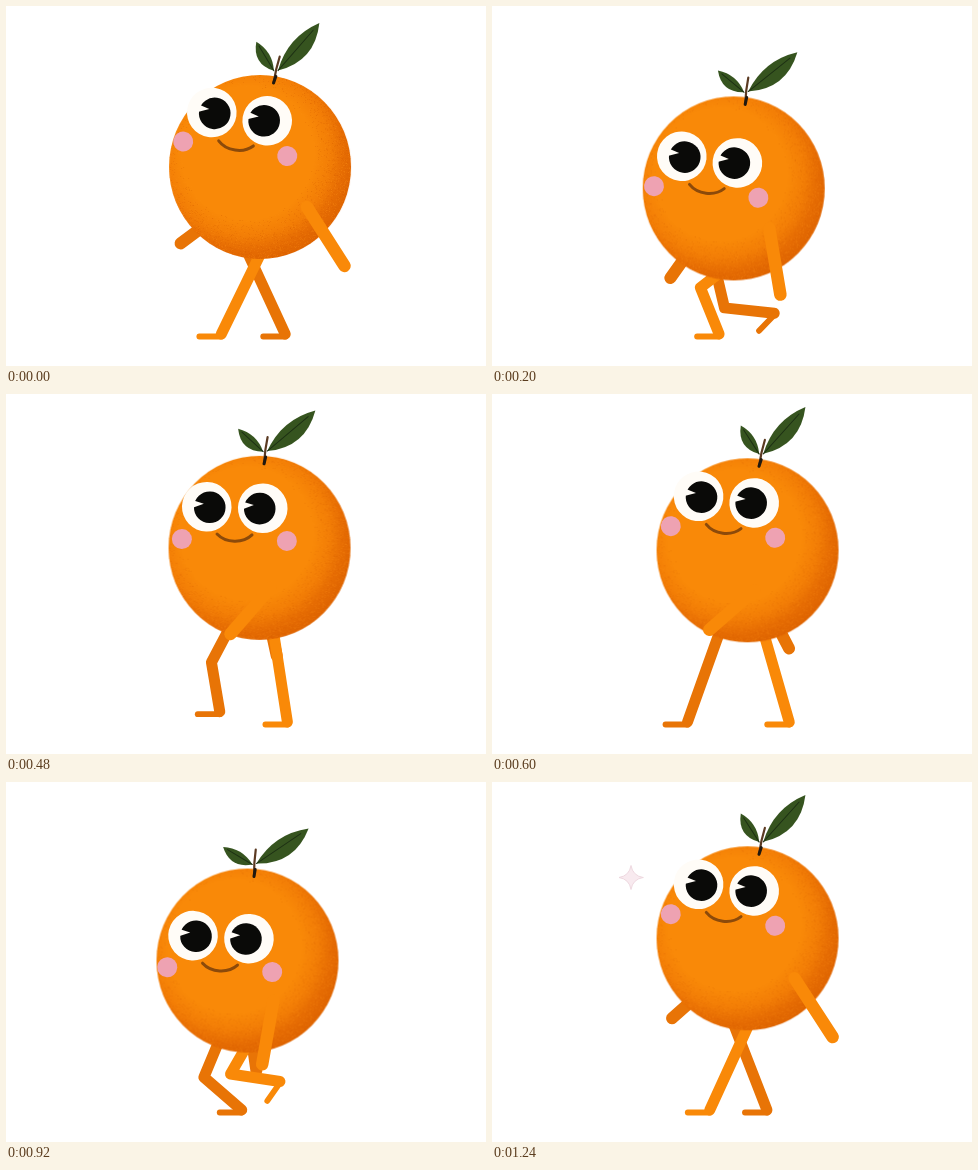
These frames come from a looping animation (480 px wide and 360 px high, 1280 ms). An HTML page with a canvas:

```html
<!DOCTYPE html>
<html lang="en">
<head>
<meta charset="utf-8">
<title>Walking orange</title>
<style>
  html, body { margin: 0; width: 100%; height: 100%; overflow: hidden; background: #fff; }
  canvas { display: block; width: 480px; height: 360px; }
</style>
</head>
<body>
<canvas id="stage" width="480" height="360"></canvas>
<script>
const LOOP = 1280, PACE = LOOP / 2, STEP = 40;
const LIGHT = '#f98908', DARK = '#e87406', LEAF = '#36541f', VEIN = '#1d3013';
const WHITE = '#fffcf7', BLACK = '#0a0a08', BLUSH = '#eea2b2';
const THIGH = 56, SHIN = 50, FOOT = 22, GROUND = 328;
const ctx = document.getElementById('stage').getContext('2d');
const rad = deg => deg * Math.PI / 180;

// Cosine between -1 and 1 that is highest at the given time
const wave = (t, peak, period) => Math.cos(2 * Math.PI * (t - peak) / period);
// Smooth rise and fall between two times, 0 elsewhere
const hump = (t, from, to) =>
  t < from || t > to ? 0 : Math.sin(Math.PI * (t - from) / (to - from)) ** 2;

function line(color, width, ...pts) {
  ctx.strokeStyle = color;
  ctx.lineWidth = width;
  ctx.lineCap = ctx.lineJoin = 'round';
  ctx.beginPath();
  for (const [x, y] of pts) ctx.lineTo(x, y);
  ctx.stroke();
}

function disc(color, x, y, r) {
  ctx.fillStyle = color;
  ctx.beginPath();
  ctx.arc(x, y, r, 0, 7);
  ctx.fill();
}

function placed(x, y, deg, draw) {
  ctx.save();
  ctx.translate(x, y);
  ctx.rotate(rad(deg));
  draw();
  ctx.restore();
}

function makePeel() {
  const c = document.createElement('canvas');
  c.width = c.height = 190;
  const g = c.getContext('2d');
  g.translate(95, 95);
  g.beginPath();
  g.ellipse(0, 0, 91, 92, 0, 0, 7);
  g.clip();
  const shade = g.createRadialGradient(-13, -14, 0, -13, -14, 112);
  shade.addColorStop(0, LIGHT);
  shade.addColorStop(0.6, LIGHT);
  shade.addColorStop(0.74, '#f37e06');
  shade.addColorStop(0.87, '#e66c03');
  shade.addColorStop(1, '#dd6301');
  g.fillStyle = shade;
  g.fillRect(-95, -95, 190, 190);
  // Sprayed grain over the shaded rim
  let seed = 7;
  const rnd = () => (seed = seed * 16807 % 2147483647) / 2147483647;
  for (let i = 0; i < 7000; i++) {
    const a = rnd() * 2 * Math.PI, r = 64 + 48 * Math.sqrt(rnd());
    g.fillStyle = rnd() < 0.5 ? 'rgba(214,92,0,.22)' : 'rgba(252,146,24,.22)';
    g.fillRect(Math.round(r * Math.cos(a)) - 13, Math.round(r * Math.sin(a)) - 14, 1, 1);
  }
  return c;
}
const peel = makePeel();

// Knee of a two-bone leg, bending toward the walking direction (left)
function kneeOf([hx, hy], [ax, ay]) {
  const dx = ax - hx, dy = ay - hy, d = Math.hypot(dx, dy);
  const along = d > THIGH + SHIN ? d / 2
    : (THIGH ** 2 - SHIN ** 2 + d * d) / (2 * d);
  const out = d > THIGH + SHIN ? 0 : Math.sqrt(THIGH ** 2 - along ** 2);
  return [hx + (dx * along - dy * out) / d, hy + (dy * along + dx * out) / d];
}

function leg(color, hip, phase, shift) {
  const p = phase % LOOP;
  const ankle = [257.5 - 43 * wave(p, 40, LOOP) - shift, GROUND - 29 * hump(p, 650, 1240)];
  const pitch = rad(56 * hump(p, 680, 1120));
  const heel = [ankle[0], ankle[1] + 2.5 * Math.cos(pitch)];
  const toe = [heel[0] - FOOT * Math.cos(pitch), heel[1] + FOOT * Math.sin(pitch)];
  line(color, 11, hip, kneeOf(hip, ankle), ankle);
  line(color, 5.8, heel, toe);
}

function farArm(x, y, t) {
  const s = wave(t, 45, LOOP);
  line(DARK, 12, [x - 12 - 30 * s, y + 48], [x - 17 - 64 * s, y + 110 - 10 * s - 25 * s * s]);
}

function nearArm(x, y, t) {
  const s = wave(t, -30, LOOP), a = rad(41 * s - 8), length = 65 + 5 * s;
  const sx = x + 27 + 20 * s, sy = y + 40;
  line(LIGHT, 12.5, [sx, sy], [sx + length * Math.sin(a), sy + length * Math.cos(a)]);
}

function leaf(x, y, deg, length, up, down) {
  placed(x, y, deg, () => {
    ctx.fillStyle = LEAF;
    ctx.beginPath();
    ctx.moveTo(0, 0);
    ctx.quadraticCurveTo(length / 2, -up, length, 0);
    ctx.quadraticCurveTo(length / 2, down, 0, 0);
    ctx.fill();
    line(VEIN, 1, [0, 0], [length * 0.85, 0]);
  });
}

function sprig(x, y, t) {
  const flap = wave(t, 330, PACE), lean = 6 - 5 * flap;
  placed(x, y, lean, () => {
    line('#5b3a22', 2.2, [0, 0], [0, -14], [1, -27]);
    line('#20180f', 3, [0, 0], [1, -7]);
    leaf(2, -13, 8 * flap - 41 - lean, 63, 15, 22);
    leaf(-2, -12, -15 * flap - 136 - lean, 34, 15, 9);
  });
}

function eye(x, look) {
  const px = x + look;
  disc(WHITE, x, 0, 24.8);
  disc(BLACK, px, 0.5, 15.8);
  ctx.fillStyle = WHITE;
  ctx.beginPath();
  ctx.moveTo(px - 17, -6);
  ctx.lineTo(px - 6, -3);
  ctx.lineTo(px - 17, 1.5);
  ctx.fill();
}

function face() {
  disc(BLUSH, -52, 33, 10);
  disc(BLUSH, 53, 32, 10);
  eye(-28, 3);
  eye(28, -3);
  ctx.strokeStyle = '#8c4a0a';
  ctx.lineWidth = 3;
  ctx.beginPath();
  ctx.moveTo(-17, 27);
  ctx.bezierCurveTo(-8, 36, 9, 36, 18, 27);
  ctx.stroke();
}

function sparkle(t) {
  if (t < 1000) return;
  const r = Math.min(12, 6 + (t - 1000) * 0.07);
  placed(139, 95.5, 0, () => {
    ctx.beginPath();
    ctx.moveTo(r, 0);
    for (let i = 1; i <= 4; i++) {
      const tip = rad(i * 90), mid = tip - rad(45);
      ctx.quadraticCurveTo(r * 0.2 * Math.cos(mid), r * 0.2 * Math.sin(mid),
        r * Math.cos(tip), r * Math.sin(tip));
    }
    ctx.fillStyle = '#f8eaef';
    ctx.fill();
    ctx.strokeStyle = '#ecd5dd';
    ctx.lineWidth = 0.9;
    ctx.stroke();
  });
}

function draw(t) {
  const x = 248.5 + 7.5 * wave(t, 565, PACE);
  const y = 167.4 + 15 * wave(t, 205, PACE);
  const tilt = 5 + 4.9 * wave(t, 80, PACE);
  const faceX = x - 23.8 + 3.4 * wave(t, 30, PACE);
  const faceY = y - 37 + 13.8 * wave(t, 295, PACE);

  ctx.fillStyle = '#fff';
  ctx.fillRect(0, 0, 480, 360);
  sparkle(t);
  farArm(x, y, t);
  leg(DARK, [x - 22, y + 65], t + PACE, 1.2 * (x - 237));
  leg(LIGHT, [x + 11, y + 65], t, 0);
  ctx.drawImage(peel, x - 95, y - 95);
  sprig(x + 2.5 + 1.3 * tilt, y - 84, t);
  placed(faceX, faceY, tilt, face);
  nearArm(x, y, t);
}

const start = performance.now();
function tick() {
  const t = (performance.now() - start) % LOOP;
  draw(Math.floor(t / STEP) * STEP);
  requestAnimationFrame(tick);
}
tick();
</script>
</body>
</html>
```
